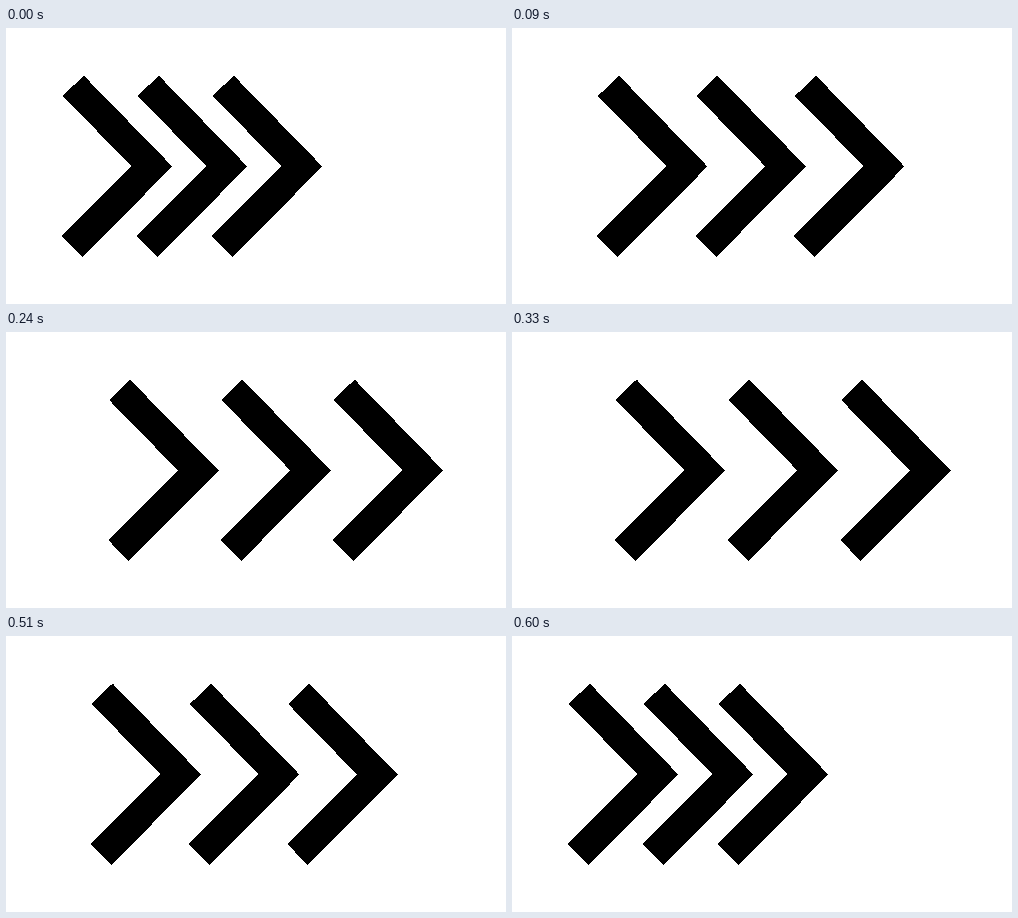
Recreate the animation shown at these times as an HTML page. Size 500 by 276 pixels, loop 0.84 s.

```html
<!DOCTYPE html>
<html lang="en">
<head>
<meta charset="utf-8">
<title>Chevrons</title>
<style>
  html, body { margin: 0; width: 100%; height: 100%; overflow: hidden; background: #fff; }
  svg { display: block; width: 100%; height: 100%; }
</style>
</head>
<body>
<svg viewBox="0 0 500 276" shape-rendering="crispEdges">
  <defs>
    <path id="chevron" d="M77.7 47.5 L166.3 138.5 L76.5 229 L55.8 208 L125.5 138.3 L56.8 68 Z"/>
  </defs>
  <use href="#chevron"/>
  <use href="#chevron"/>
  <use href="#chevron"/>
</svg>
<script>
const LOOP = 840, STEP = 30, HALF = 300;
const SPACING = 75, TRAVEL = [47, 85, 122.8];
const chevrons = document.querySelectorAll('use');

// cubic-bezier(x1, 0, 0, 1): quick start, long settle
function ease(x, x1) {
  let lo = 0, hi = 1;
  for (let i = 0; i < 24; i++) {
    const s = (lo + hi) / 2;
    if (3 * (1 - s) ** 2 * s * x1 + s ** 3 < x) lo = s; else hi = s;
  }
  return lo * lo * (3 - 2 * lo);
}

function spread(t) {
  if (t >= 2 * HALF) return 0;
  return t <= HALF ? ease(t / HALF, 0.34) : ease(2 - t / HALF, 0.35);
}

function draw() {
  const t = Math.floor(performance.now() % LOOP / STEP) * STEP;
  const amount = spread(t);
  chevrons.forEach((chevron, i) => chevron.setAttribute('x', i * SPACING + TRAVEL[i] * amount));
  requestAnimationFrame(draw);
}
draw();
</script>
</body>
</html>
```
